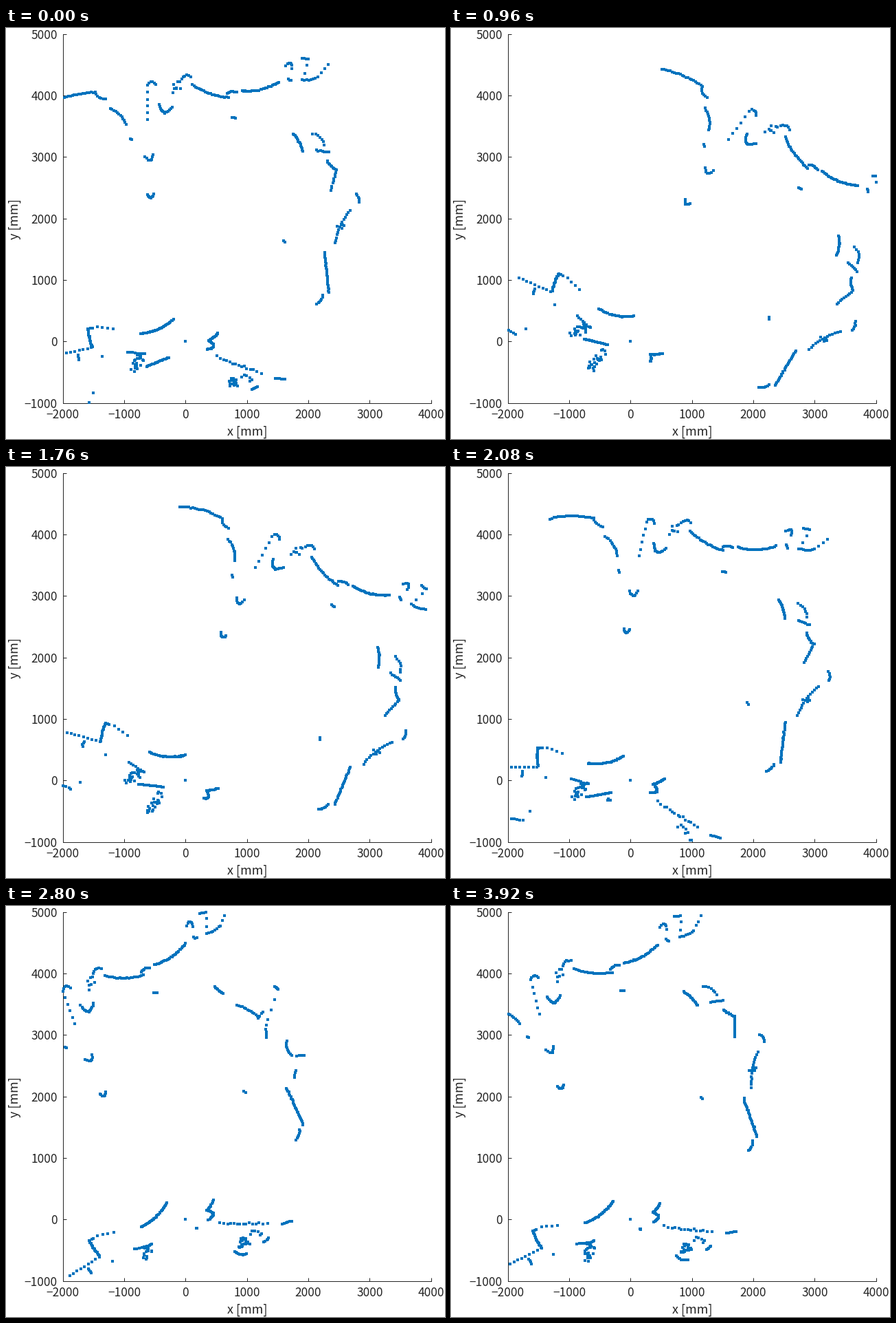
Animation, 639 px wide and 597 px high, one loop 4 s. Source, as a matplotlib script:

```python
import numpy as np
import matplotlib.pyplot as plt
from matplotlib.animation import FuncAnimation

W, H, DPI = 639, 597, 100
FRAMES, INTERVAL = 50, 80
BLUE, INK = "#0072bd", "#262626"
PX = 72 / DPI
LEFT, BASE, SIDE = 82.7, 544.7, 536  # axes corner and side in pixels

plt.rcParams["font.family"] = "Noto Sans CJK JP"
rng = np.random.default_rng(4)


def line(n, a, b, sag=0, fuzz=0):
    """n points from a to b, bowed sag to the left; x + yj in cm."""
    t = np.linspace(0, 1, n)
    bow = 4 * sag * t * (1 - t) * 1j * (b - a) / abs(b - a)
    blur = rng.normal(0, 1, n) + 1j * rng.normal(0, 1, n)
    return a + (b - a) * t + bow + fuzz * blur


def clump(n, centre, w, h):
    """n points strewn over a box of half width w and half height h."""
    return centre + w * rng.uniform(-1, 1, n) + 1j * h * rng.uniform(-1, 1, n)


def back_wall():
    return [
        line(22, -217 + 389j, -147 + 405j, 4),
        line(6, -146 + 402j, -130 + 395j, -3),
        line(12, -123 + 379j, -97 + 353j, 4),
        line(2, -90 + 330j, -88 + 328j),
        line(22, 11 + 417j, 70 + 397j, -4),
        line(8, 68 + 403j, 84 + 405j, 2),
        line(28, 92 + 407j, 152 + 422j, -5),
        line(3, 76 + 364j, 81 + 363j),
    ]


def furniture():
    return [
        line(8, -66 + 301j, -53 + 304j, -8),
        line(9, -62 + 239j, -52 + 239j, -5),
        line(6, -62 + 360j, -62 + 417j),
        line(5, -60 + 421j, -49 + 418j, 3),
        line(14, -43 + 385j, -22 + 381j, -11),
        clump(8, -15 + 413j, 7, 10),
        line(6, -6 + 427j, 9 + 431j, 4),
        line(7, 163 + 449j, 173 + 444j, 7),
        line(3, 168 + 427j, 172 + 424j),
        line(4, 190 + 460j, 200 + 459j),
        line(2, 198 + 449j, 194 + 436j),
        line(8, 190 + 426j, 215 + 430j, -2),
        line(3, 221 + 437j, 232 + 450j),
        line(2, 160 + 164j, 162 + 161j),
    ]


def right_side():
    return [
        line(16, 175 + 338j, 191 + 310j, 2),
        line(7, 207 + 338j, 226 + 320j, 4),
        line(7, 213 + 311j, 233 + 308j),
        line(10, 231 + 294j, 246 + 279j, -2),
        line(10, 246 + 279j, 237 + 246j),
        line(6, 278 + 240j, 282 + 226j, 2),
        line(14, 268 + 213j, 244 + 160j, -4),
        clump(5, 252 + 187j, 7, 3),
    ]


def right_side_blocked():
    return [
        line(9, 173 + 340j, 182 + 325j),
        line(14, 197 + 300j, 224 + 269j, 2),
        line(4, 222 + 268j, 233 + 275j),
        line(5, 230 + 252j, 224 + 234j),
        line(3, 236 + 260j, 258 + 287j),
        line(5, 265 + 307j, 269 + 301j),
        line(10, 253 + 217j, 254 + 193j, -4),
        line(4, 261 + 189j, 272 + 186j),
        line(4, 251 + 167j, 245 + 157j),
    ]


def near_right():
    return [
        line(26, 227 + 145j, 233 + 80j),
        line(7, 224 + 75j, 213 + 61j, 2),
        line(14, 53 + 14j, 38 + 2j, 1),
        line(16, 38 + 2j, 35 - 13j, 9),
        line(15, 51 - 27j, 121 - 50j, 0, 1.5),
        clump(20, 76 - 67j, 9, 7),
        line(6, 92 - 55j, 108 - 62j, 0, 2),
        line(5, 108 - 78j, 117 - 74j),
        line(6, 146 - 60j, 162 - 61j),
        line(10, 58 - 76j, 75 - 86j, -3),
        clump(4, 12 - 20j, 1, 2),
    ]


def near_left():
    return [
        line(30, -20 + 36j, -73 + 13j, 5),
        line(7, -95 - 17j, -70 - 20j),
        line(26, -72 - 20j, -84 - 45j, 0, 4),
        line(20, -64 - 41j, -27 - 26j),
        clump(26, -28 - 56j, 7, 20),
        line(3, -152 + 22j, -159 + 21j),
        line(18, -159 + 21j, -152 - 8j, -1),
        line(4, -144 + 24j, -118 + 20j),
        line(9, -208 - 22j, -153 - 10j),
        line(4, -176 - 22j, -174 - 30j),
        line(2, -135 - 24j, -150 - 83j),
        line(5, -177 - 101j, -158 - 100j),
    ]


room = np.concatenate(back_wall() + furniture() + near_right() + near_left())
clear = np.concatenate(right_side())
blocked = np.concatenate(right_side_blocked())

# Sensor heading in degrees, joined by cubic Hermite curves.
KEYS = np.array([0, 7, 17, 26, 35, 39, 43, 49])
TURNS = np.array([0, -21, -42, -12, 19.8, 29, 27, 14.2])
SLOPES = np.gradient(TURNS, KEYS)


def heading(frame):
    i = min(np.searchsorted(KEYS, frame, "right"), len(KEYS) - 1) - 1
    h = KEYS[i + 1] - KEYS[i]
    t = (frame - KEYS[i]) / h
    ease = t * t * (3 - 2 * t)
    bend = h * t * (1 - t) * (SLOPES[i] * (1 - t) - SLOPES[i + 1] * t)
    return TURNS[i] + (TURNS[i + 1] - TURNS[i]) * ease + bend


def scan(frame):
    z = 10 * np.concatenate([room, blocked if 31 <= frame < 46 else clear])
    noise = np.random.default_rng(frame).normal(0, 4, z.size)
    z = (z + noise * z / abs(z)) * np.exp(1j * np.radians(heading(frame)))
    # The sensor sees 270 degrees, centred on the y axis.
    seen = np.abs(np.degrees(np.angle(z / 1j))) <= 135.5
    inside = (abs(z.real - 1000) <= 3000) & (abs(z.imag - 2000) <= 3000)
    z = np.append(z[seen & inside], 0)
    return z.real, z.imag


fig = plt.figure(figsize=(W / DPI, H / DPI), dpi=DPI, facecolor="white")
ax = fig.add_axes([LEFT / W, 1 - BASE / H, SIDE / W, SIDE / H])
ax.set(xlim=(-2000, 4000), ylim=(-1000, 5000),
       xticks=range(-2000, 4001, 1000), yticks=range(-1000, 5001, 1000))
for name, spine in ax.spines.items():
    spine.set_visible(name in ("left", "bottom"))
    spine.set(color=INK, linewidth=PX)
ax.tick_params(direction="in", length=5 * PX, width=PX, pad=8 * PX,
               color=INK, labelcolor=INK, labelsize=17.3 * PX)
label = dict(color=INK, fontsize=18 * PX, ha="center", va="center")
fig.text(351 / W, 1 - 587 / H, "x [mm]", **label)
fig.text(13 / W, 1 - 277.5 / H, "y [mm]", rotation=90, **label)

dots, = ax.plot([], [], "s", color=BLUE, markersize=4 * PX,
                markeredgewidth=0, antialiased=False, clip_on=False, zorder=3)


def draw(frame):
    dots.set_data(*scan(frame))
    return dots,


anim = FuncAnimation(fig, draw, frames=FRAMES, interval=INTERVAL,
                     repeat=True, repeat_delay=0)
plt.show()
```
